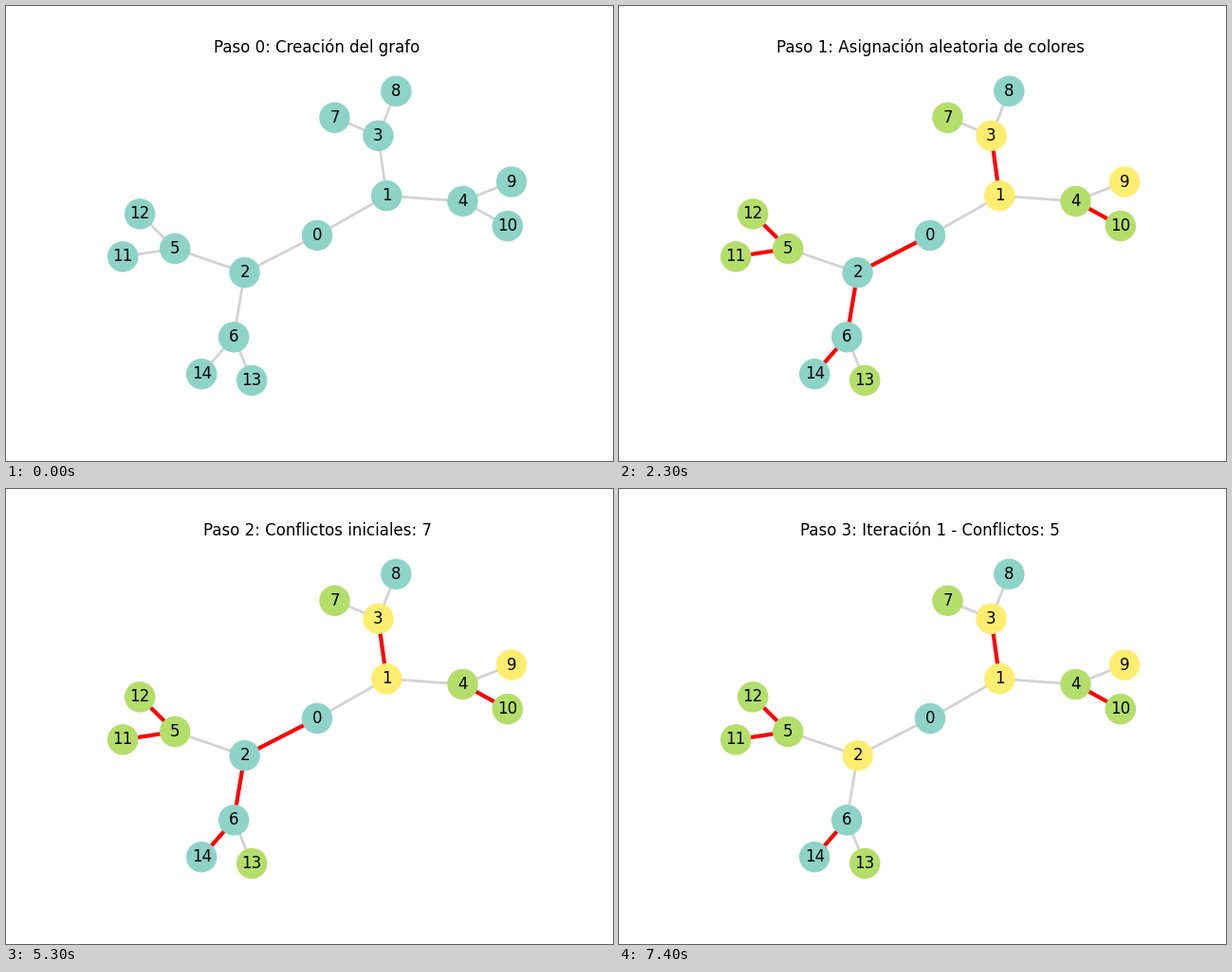
These frames come from a looping animation (640 by 480 pixels, 8000 ms). A matplotlib script:

```python
import matplotlib.pyplot as plt
from matplotlib.animation import FuncAnimation
from matplotlib.collections import LineCollection

W, H, DPI = 640, 480, 100
STEP_MS = 500
LOOP_MS = 8000

TEAL, YELLOW, GREEN = "#8dd3c7", "#ffed6f", "#b3de69"
PALETTE = {"t": TEAL, "y": YELLOW, "g": GREEN}

# Node centres in stage pixels, y downwards
POS = [
    (328, 242), (401.2, 200.2), (251.6, 281.2), (392.5, 136.8), (481.5, 206),
    (178.2, 256), (240.2, 349.3), (346.5, 117.8), (411.3, 89.8), (533, 185.5),
    (528.8, 232.1), (123.2, 264.4), (141.2, 219.4), (259.2, 395), (206.2, 388.2),
]
# Binary tree: every node hangs from (n - 1) // 2
EDGES = [((n - 1) // 2, n) for n in range(1, len(POS))]

START = "tytyggtgtyggggt"
FIXED = START[:2] + "y" + START[3:]


def conflicts(colors):
    return [(a, b) for a, b in EDGES if colors[a] == colors[b]]


# (start time, title, colouring or None before any is assigned)
STAGES = [
    (0, "Paso 0: Creación del grafo", None),
    (500, "Paso 1: Asignación aleatoria de colores", START),
    (3500, f"Paso 2: Conflictos iniciales: {len(conflicts(START))}", START),
    (6500, f"Paso 3: Iteración 1 - Conflictos: {len(conflicts(FIXED))}", FIXED),
]

fig = plt.figure(figsize=(W / DPI, H / DPI), dpi=DPI, facecolor="white")
ax = fig.add_axes([0.125, 0.11, 0.775, 0.77])
ax.set_xlim(0.125 * W, 0.9 * W)
ax.set_ylim(0.89 * H, 0.12 * H)
ax.axis("off")


def segments(edges):
    return [(POS[a], POS[b]) for a, b in edges]


plain = LineCollection([], colors="lightgray", linewidths=2, zorder=1)
clash = LineCollection([], colors="red", linewidths=3, zorder=1.5)
ax.add_collection(plain, autolim=False)
ax.add_collection(clash, autolim=False)
nodes = ax.scatter(*zip(*POS), s=500, c=TEAL, linewidths=1, zorder=2)
for n, (x, y) in enumerate(POS):
    ax.text(x, y, str(n), size=12, ha="center", va="center", zorder=3)
title = ax.set_title("", fontsize=12)


def draw(frame):
    t = frame * STEP_MS
    _, text, colors = [s for s in STAGES if s[0] <= t][-1]
    bad = conflicts(colors) if colors else []
    plain.set_segments(segments(e for e in EDGES if e not in bad))
    clash.set_segments(segments(bad))
    nodes.set_color([PALETTE[c] for c in colors or "t" * len(POS)])
    title.set_text(text)
    return plain, clash, nodes, title


anim = FuncAnimation(fig, draw, frames=LOOP_MS // STEP_MS, interval=STEP_MS,
                     repeat=True, repeat_delay=0, blit=False)
plt.show()
```
